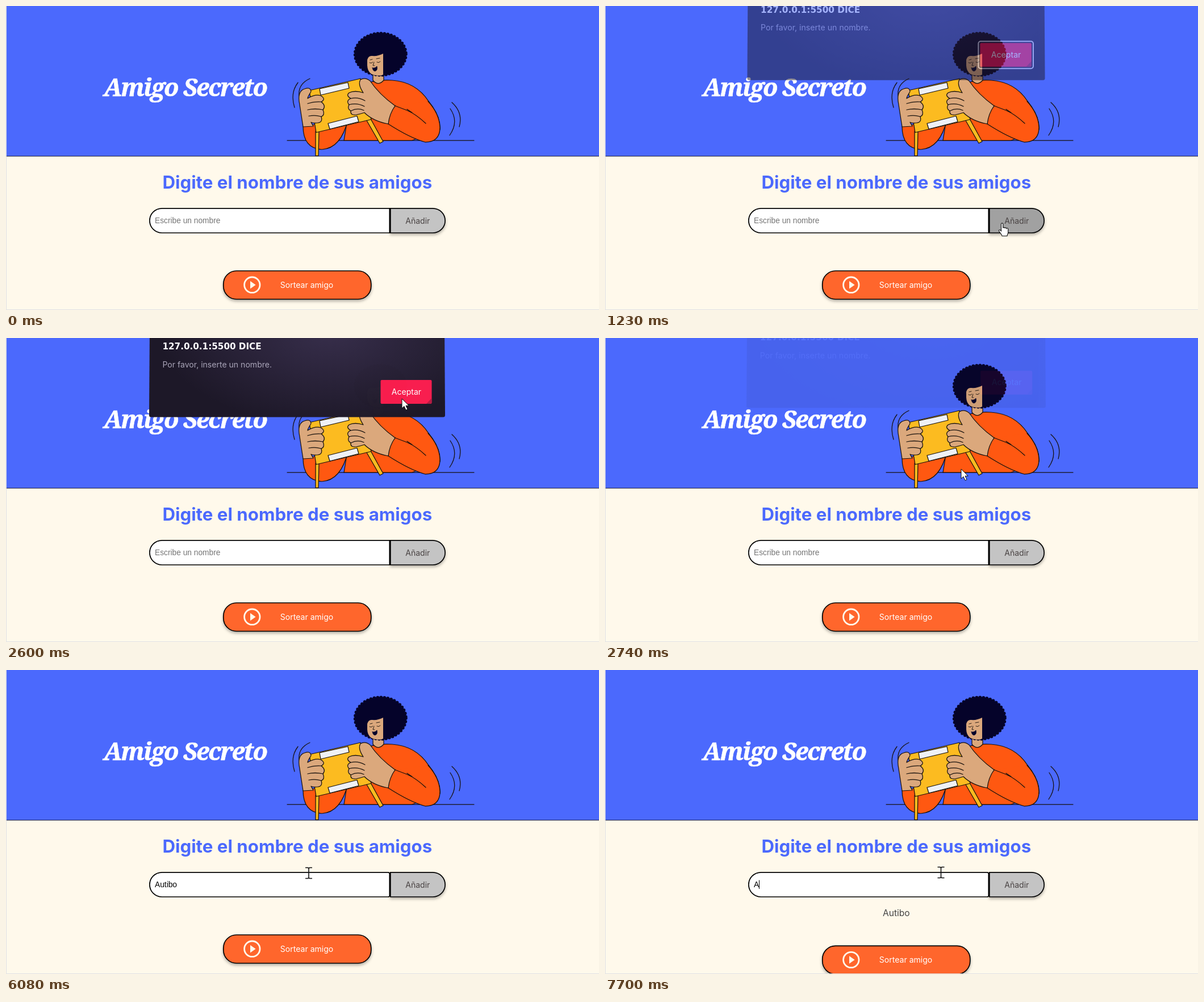
Animation, 1044 px wide and 536 px high, one loop 8000 ms. Source, as an HTML page:

```html
<!DOCTYPE html>
<html lang="es">
<head>
<meta charset="utf-8">
<title>Amigo Secreto</title>
<style>
  html, body { margin: 0; width: 100%; height: 100%; overflow: hidden; background: #fff9eb; }
  svg { display: block; width: 100vw; height: 100vh; }
  text { font: 14.05px Inter, sans-serif; font-optical-sizing: none; white-space: pre; }
  .mid { text-anchor: middle; }
  #title { font: italic 700 43px "Noto Serif", serif; letter-spacing: -2px; fill: #fff; stroke: #fff; stroke-width: .7; }
  #heading { font-size: 31.25px; font-weight: 700; fill: #4b69fd; }
  #value { font: 13.76px "Liberation Sans", Arial, sans-serif; }
  #friend { font-size: 15.6px; fill: #444; }
  #host { font: 700 15.2px "DejaVu Sans", sans-serif; fill: #fff; }
  .box { stroke: #000; stroke-width: 1.7; }
  .shadow { filter: drop-shadow(0 3px 2.5px rgba(0, 0, 0, .3)); }
  #art { stroke: #17110d; stroke-width: 1.25; stroke-linejoin: round; stroke-linecap: round; fill: none; }
  .cloth { fill: #ff5811; }
  .skin { fill: #dba87c; }
  .wood { fill: #fcbb20; }
  .label { fill: #eff1f6; }
  .hair { fill: #05032a; stroke: #05032a; }
</style>
</head>
<body>
<svg viewBox="0 0 1044 536" preserveAspectRatio="none">
  <defs>
    <radialGradient id="night" gradientUnits="userSpaceOnUse" cx="570" cy="-10" r="300" gradientTransform="translate(0 -4) scale(1 .55)">
      <stop offset="0" stop-color="#372e4a"/>
      <stop offset="1" stop-color="#1d1827"/>
    </radialGradient>
  </defs>

  <rect width="1044" height="536" fill="#fff9eb"/>
  <rect width="1044" height="265" fill="#4b69fd"/>
  <rect y="264.4" width="1044" height=".9" fill="#14151f"/>

  <g id="art">
    <path d="M495 237H824"/>
    <path d="M514 135Q500 153 508 179M535 128Q511 139 517 164M785 170Q805 188 798 213M782 181Q798 204 781 228"/>
    <path class="cloth" d="M523 212Q523 251 556 253Q590 251 602 200Z"/>
    <path class="cloth" d="M625 142Q645 129 680 131Q722 134 744 168Q766 195 764 218L715 237H595L601 200Z"/>
    <path class="skin" d="M646 112V131Q655 142 665 131V112Z"/>
    <ellipse class="hair" cx="659.3" cy="85" rx="44.5" ry="36.500"/>
    <ellipse class="hair" cx="659.3" cy="85" rx="44.5" ry="36.500" stroke-width="6" stroke-dasharray="0 6"/>
    <path class="skin" stroke="none" d="M636 95Q638 87 645 88Q654 89 664 84V121Q660 124 650 122Q637 120 636 105Z"/>
    <path d="M640 100Q643 102 646 99M653 99Q656 101 659 98M641 95L645 94M652 93L658 92M648 99L646 105H649" stroke-width=".9"/>
    <path class="hair" d="M645 109Q650 110 653 106Q655 113 650 115Q646 115 645 109Z" stroke-width=".6"/>
    <path class="wood" d="M545 221H551L550 264H545ZM635 202L658 242L664 239L642 199Z"/>
    <path class="wood" d="M534 149L624 128L643 200L546 223Z"/>
    <path class="label" d="M552 146L602 135L604 145L554 157ZM567 207L618 194L621 204L570 217Z"/>
    <path class="skin" d="M523 213L517 174Q512 150 526 146Q536 142 537 151Q531 160 531 163Q544 155 554 158Q564 164 555 169Q564 176 558 183Q562 192 555 195Q558 205 549 206Q541 207 537 205L541 212Z"/>
    <path d="M531 172Q543 168 555 169M531 183Q544 180 558 183M533 194Q545 192 555 195"/>
    <path class="cloth" d="M685 176Q674 188 673 208Q712 233 738 240Q764 240 764 214Q763 190 743 168"/>
    <path d="M685 176L706 184Q722 191 739 207M706 182L715 188"/>
    <path class="skin" d="M685 176Q657 156 641 132Q632 125 624 130Q619 138 629 153Q614 148 604 153Q598 158 607 163Q598 167 604 174Q600 181 607 185Q606 193 616 192Q625 190 631 188Q646 203 673 208Q675 190 685 176Z"/>
    <path d="M607 163Q620 160 632 167M604 174Q618 170 631 177M607 185Q619 179 630 184"/>
  </g>

  <text id="title" class="mid" x="315.500" y="159">Amigo Secreto</text>
  <text id="heading" class="mid" x="512.8" y="321.5">Digite el nombre de sus amigos</text>

  <path id="add" class="box shadow" d="M676.8 356.800H751.500A21.600 21.600 0 0 1 751.500 400H676.8Z"/>
  <path id="field" class="box" fill="#fff"/>
  <text class="mid" x="724.8" y="383.6" fill="#4a4444">Añadir</text>
  <text id="value" x="262" y="382.8"></text>
  <path id="caret" d="M0 370.5V386" stroke="#000"/>
  <text id="friend" class="mid" x="512.8" y="433.8">Autibo</text>

  <g id="draw">
    <rect class="box shadow" x="382.8" y="467" width="260" height="50" rx="23" fill="#ff662c"/>
    <circle cx="433.3" cy="491.7" r="13.7" fill="none" stroke="#fff9eb" stroke-width="2.8"/>
    <path d="M430 485V498.4L439.6 491.7Z" fill="#fff9eb"/>
    <text x="482.8" y="496.8" fill="#fff">Sortear amigo</text>
  </g>

  <g id="dialog">
    <path d="M253-20H772L773 136Q773 139.500 769.500 139.500H255.500Q252 139.500 252 136Z" fill="url(#night)"/>
    <text id="host" x="275.500" y="20.500">127.0.0.1:5500 DICE</text>
    <text x="275.500" y="52" fill="#aaa5b8">Por favor, inserte un nombre.</text>
    <rect x="659.500" y="74" width="90" height="42" rx="2" fill="#fa1e4e"/>
    <path d="M749.500 106V114L747.500 116H740Z" fill="#b51c42"/>
    <rect id="ring" x="656.500" y="71" width="96" height="48" rx="4" fill="none" stroke="#e6e4ee" stroke-width="2"/>
    <text x="678.800" y="99.700" fill="#fff">Aceptar</text>
  </g>

  <path d="M.5 0V535.5H1044" fill="none" stroke="#dfdfe3"/>
  <path id="cursor"/>
</svg>

<script>
const LOOP = 8000;
const NAME = "Autibo";
const KEY_TIMES = [4880, 5080, 5280, 5370, 5460, 5550];
const ADDED = 6640;

const MOVES = [
  [200, 960, 12, [[866, 530], [800, 485], [720, 440], [670, 408], [699, 383]]],
  [1620, 2390, 12, [[705, 370], [735, 300], [690, 180], [640, 92], [658, 80], [697, 107]]],
  [2460, 3080, 10, [[697, 107], [697, 107], [697, 107], [662, 169], [627, 231],
                    [585, 295], [545, 335], [525, 350], [518, 356], [518, 356]]],
  [3500, 3560, 2, [[518, 358], [518, 363]]],
  [3960, 4020, 2, [[517, 362], [515.5, 361]]],
  [6080, 6830, 11, [[533, 358], [690, 290], [875, 345], [740, 382], [735, 390], [749, 514]]],
  [6900, 7170, 4, [[725, 480], [670, 420], [610, 370], [591.5, 357]]]
];

const CURSORS = {
  arrow: ["M0 0V17L4 13.4L7 20L10 18.700L7 12.300H12.200Z", "#fff", "#111", 1],
  hand: ["M-1.500 1.500C-1.500-.7 1.700-.7 1.700 1.500V8.500C2 6.900 4.700 7 4.800 8.800C5.200 7.400 7.700 7.700 7.900 9.300" +
         "C8.400 8.200 10.700 8.500 10.700 10.300V16C10.700 18.500 9 19.500 9 22.500H0C-.4 19.500-3.400 17.500-5.300 14" +
         "C-6.300 12-4.300 11-2.700 12.500L-1.500 13.800Z", "#fff", "#111", 1.1],
  ibeam: ["M-6-9.500H-1.500L0-8.500L1.500-9.500H6M0-8.500V8.500M-6 9.500H-1.500L0 8.500L1.500 9.500H6", "none", "#111", 1.6]
};

const el = id => document.getElementById(id);
const set = (id, attrs) => {
  for (const key in attrs) el(id).setAttribute(key, attrs[key]);
};
const show = (id, on) => set(id, { visibility: on ? "visible" : "hidden" });
const clamp = v => Math.max(0, Math.min(1, v));
const between = (v, a, b) => v >= a && v < b;

function pointer(t) {
  const move = MOVES.filter(m => t >= m[0]).pop();
  if (!move) return null;
  const [start, end, steps, points] = move;
  const p = Math.floor(clamp((t - start) / (end - start)) * (steps - 1) + 1e-6) / (steps - 1);
  const at = p * (points.length - 1);
  const i = Math.min(Math.floor(at), points.length - 2);
  return [0, 1].map(k => points[i][k] + (points[i + 1][k] - points[i][k]) * (at - i));
}

function typed(t) {
  if (t >= 7700) return NAME[0];
  return t < ADDED ? NAME.slice(0, KEY_TIMES.filter(k => t >= k).length) : "";
}

function drawPointer(t) {
  const pos = pointer(t);
  show("cursor", pos);
  if (!pos) return false;
  const [x, y] = pos;
  const onAdd = between(x, 676, 774) && between(y, 356, 401);
  const onField = between(x, 252, 676) && between(y, 353, 401);
  const blocked = between(t, 1620, 2700);
  const kind = blocked ? "arrow" : onAdd ? "hand" : onField ? "ibeam" : "arrow";
  const [d, fill, stroke, width] = CURSORS[kind];
  set("cursor", { d, fill, stroke, "stroke-width": width, transform: `translate(${x} ${y})` });
  return onAdd && !between(t, 1300, 2700);
}

function drawForm(t, hover) {
  const focused = between(t, 3500, 6570) || t >= 7030;
  const r = focused ? 2.5 : 0;
  const text = typed(t);
  set("add", { fill: hover ? "#a1a1a1" : "#c4c4c4" });
  set("field", {
    d: `M274.500 356.800H${675.3 - r}q${r} 0 ${r} ${r}V${400 - r}q0 ${r} ${-r} ${r}H274.500A21.600 21.600 0 0 1 274.500 356.800Z`
  });
  el("value").textContent = text || "Escribe un nombre";
  set("value", { fill: text ? "#000" : "#757575" });
  const caretX = 262.5 + (text ? el("value").getComputedTextLength() : 0);
  set("caret", { transform: `translate(${Math.floor(caretX) + .5} 0)` });
  show("caret", between(t, 3500, 4020) || between(t, 4550, 6080) || between(t, 7030, 7500) || t >= 7700);
  show("friend", t >= ADDED);
  set("draw", { transform: `translate(0 ${t >= ADDED ? 19.3 : 0})` });
}

function drawDialog(t) {
  const open = clamp((t - 1100) / 260) * (1 - clamp((t - 2600) / 152));
  const away = 1 - open;
  const scale = 1 + .012 * away;
  set("dialog", {
    opacity: open,
    transform: `translate(${512.5 * (1 - scale)} ${-17.5 * away}) scale(${scale} 1)`
  });
  show("ring", t < 2460);
}

function render(t) {
  drawForm(t, drawPointer(t));
  drawDialog(t);
}

const start = performance.now();
function tick() {
  render((performance.now() - start) % LOOP);
  requestAnimationFrame(tick);
}
tick();
</script>
</body>
</html>
```
